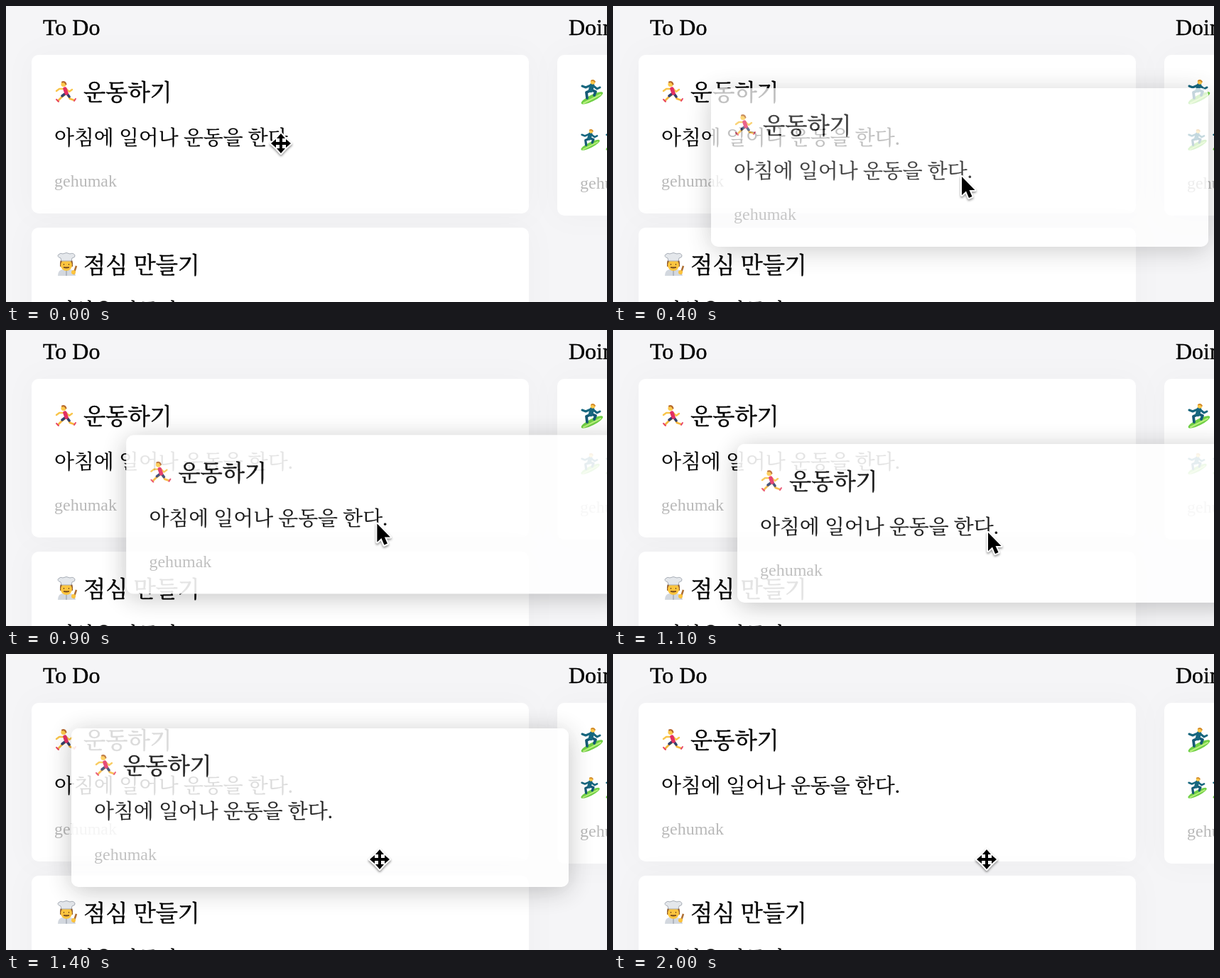
An HTML page for the animation above (2480 ms loop, 846 px wide and 418 px high).

```html
<!DOCTYPE html>
<html lang="ko">
<head>
<meta charset="utf-8">
<style>
  html, body { margin: 0; width: 100%; height: 100%; overflow: hidden; background: #f5f5f7; }
  svg { display: block; }
  text { font-family: "Liberation Serif", "Noto Serif CJK KR", "Noto Sans CJK KR", serif; }
  .head { font-size: 32px; stroke: #000; stroke-width: .4; }
  .title { font-size: 32.3px; stroke: #000; stroke-width: .5; }
  .body { font-size: 28.9px; stroke: #000; stroke-width: .2; }
  .name { font-size: 24px; fill: #b9b9b9; }
  .panel { fill: #fff; filter: drop-shadow(0 0 20px rgba(0, 0, 20, .028)); }
  #drag .panel { filter: drop-shadow(0 6px 18px rgba(0, 0, 0, .25)); }
  .cursor { stroke: #fff; stroke-width: 4; stroke-linejoin: round; paint-order: stroke; }
  #arrow, #move { filter: drop-shadow(0 2px 1.5px rgba(0, 0, 0, .4)); }
</style>
</head>
<body>
<svg width="846" height="418" viewBox="0 0 846 418">
  <defs>
    <g id="runner" fill="none" stroke-linecap="round" stroke-linejoin="round">
      <path d="M13 19L8 23L3 28M17 19L20 25L26 27" stroke="#f6b73c" stroke-width="2.800"/>
      <path d="M1 26L4 29M26 28L28 25" stroke="#e8466a" stroke-width="2"/>
      <path d="M13 18L9 21M16 18L19 22" stroke="#34406b" stroke-width="3.600"/>
      <path d="M11 11L5 11L1 14M15 11L19 15L23 12" stroke="#f9c54a" stroke-width="2.400"/>
      <path d="M13 11L15 17" stroke="#e32f63" stroke-width="5.500"/>
      <circle cx="11" cy="4.500" r="3.600" fill="#fcc94c"/>
      <path d="M9 1.500Q13 0 14.500 4.500" stroke="#b5672a" stroke-width="2"/>
    </g>
    <g id="surfer" fill="none" stroke-linecap="round" stroke-linejoin="round">
      <g transform="rotate(-27 17 26)">
        <ellipse cx="17" cy="26" rx="17" ry="4.500" fill="#6fcf45"/>
        <path d="M3 27H30" stroke="#b9f07c" stroke-width="2"/>
      </g>
      <path d="M16 15L9 18L10 26M17 15L22 17L20 22" stroke="#155a75" stroke-width="3.800"/>
      <path d="M17 8L15 15" stroke="#17677f" stroke-width="6.500"/>
      <path d="M15 8L8 11L3 9M19 9L24 13L28 11" stroke="#17677f" stroke-width="3"/>
      <circle cx="18" cy="3.500" r="3.200" fill="#fcc94c"/>
      <path d="M16 1.500Q19 0 21 3" stroke="#d18a2c" stroke-width="1.800"/>
    </g>
    <g id="chef">
      <path d="M2 32Q2 23 10 23H18Q26 23 27 32Z" fill="#d3d8df"/>
      <path d="M14 24V32" stroke="#8d949f"/>
      <path d="M5 14Q5 7 14 7Q23 7 23 14V19H5Z" fill="#8f5a2e"/>
      <circle cx="14" cy="17" r="8" fill="#fcc43e"/>
      <path d="M7 11L6 7Q0 5 3 2Q6-1 9 1Q14-2 19 1Q24-1 26 3Q27 6 22 7L21 11Z" fill="#e4e7eb" stroke="#a8aeb7"/>
      <path d="M10 16H11M17 16H18M10 20Q14 21 18 20" fill="none" stroke="#6b421d" stroke-width="1.800"/>
      <path d="M28 18L24 30" stroke="#ad6f35" stroke-width="2.500"/>
      <circle cx="24" cy="27" r="3" fill="#fcc43e"/>
    </g>
    <g id="card">
      <rect class="panel" width="700" height="224" rx="10"/>
      <use href="#runner" x="34" y="37"/>
      <text class="title" x="73" y="64">운동하기</text>
      <text class="body" x="32" y="127">아침에 일어나 운동을 한다.</text>
      <text class="name" x="32" y="186">gehumak</text>
    </g>
  </defs>

  <text class="head" x="52" y="41">To Do</text>
  <text class="head" x="792" y="41">Doing</text>
  <use href="#card" x="36" y="69"/>

  <g transform="translate(36 313)">
    <rect class="panel" width="700" height="224" rx="10"/>
    <use href="#chef" x="35" y="36"/>
    <text class="title" x="73" y="64">점심 만들기</text>
    <text class="body" x="32" y="127">점심을 만든다.</text>
  </g>

  <g transform="translate(776 69)">
    <rect class="panel" width="700" height="227" rx="10"/>
    <use href="#surfer" x="32" y="35"/>
    <use href="#surfer" transform="translate(32 105) scale(.86)"/>
    <use href="#surfer" transform="translate(67 105) scale(.86)"/>
    <text class="name" x="32" y="189">gehumak</text>
  </g>

  <g id="drag">
    <rect class="panel" width="700" height="223" rx="10"/>
    <use href="#card"/>
  </g>
  <path id="arrow" class="cursor" d="M0 0V26L6 20.500L10 30L14.500 28L10.500 19H18.500Z"/>
  <g id="move">
    <path d="M0-16L16 0L0 16L-16 0Z" fill="#fff"/>
    <path class="cursor" stroke-width="3" d="M0-14L6-7H2V-2H7V-6L14 0L7 6V2H2V7H6L0 14L-6 7H-2V2H-7V6L-14 0L-7-6V-2H-2V-7H-6Z"/>
  </g>
</svg>
<script>
  const LOOP = 2480, STEP = 100, GRAB = 300, DROP = 1300, END = 2000;
  // time, card x, card y, opacity
  const path = [
    [300, 71, 64, .5], [400, 138, 116, .75], [600, 161, 130, .9], [1100, 175, 161, .89],
    [1200, 175, 165, .89], [1400, 92, 105, .86], [1500, 59, 80, .8], [1600, 42, 69, .7],
    [1700, 36, 69, .5], [2000, 36, 69, 0]
  ];
  const [drag, arrow, move] = ['drag', 'arrow', 'move'].map(id => document.getElementById(id));

  function poseAt(t) {
    const i = Math.max(1, path.findIndex(p => p[0] >= t));
    const a = path[i - 1], b = path[i];
    const k = (t - a[0]) / (b[0] - a[0]);
    return a.map((v, j) => v + (b[j] - v) * k);
  }
  const place = (el, x, y) => el.setAttribute('transform', `translate(${x} ${y})`);
  const show = (el, on) => el.style.display = on ? '' : 'none';

  function draw(now) {
    const t = Math.floor(now % LOOP / STEP) * STEP;
    const lifted = t >= GRAB && t < END, held = t >= GRAB && t < DROP;
    show(drag, lifted);
    show(arrow, held);
    show(move, !held);
    if (lifted) {
      const [, x, y, opacity] = poseAt(t);
      place(drag, x, y);
      drag.style.opacity = opacity;
      place(arrow, x + 353, y + 125);
    }
    place(move, ...(t < GRAB ? [387, 194] : [526, 290]));
    requestAnimationFrame(draw);
  }
  requestAnimationFrame(draw);
</script>
</body>
</html>
```
